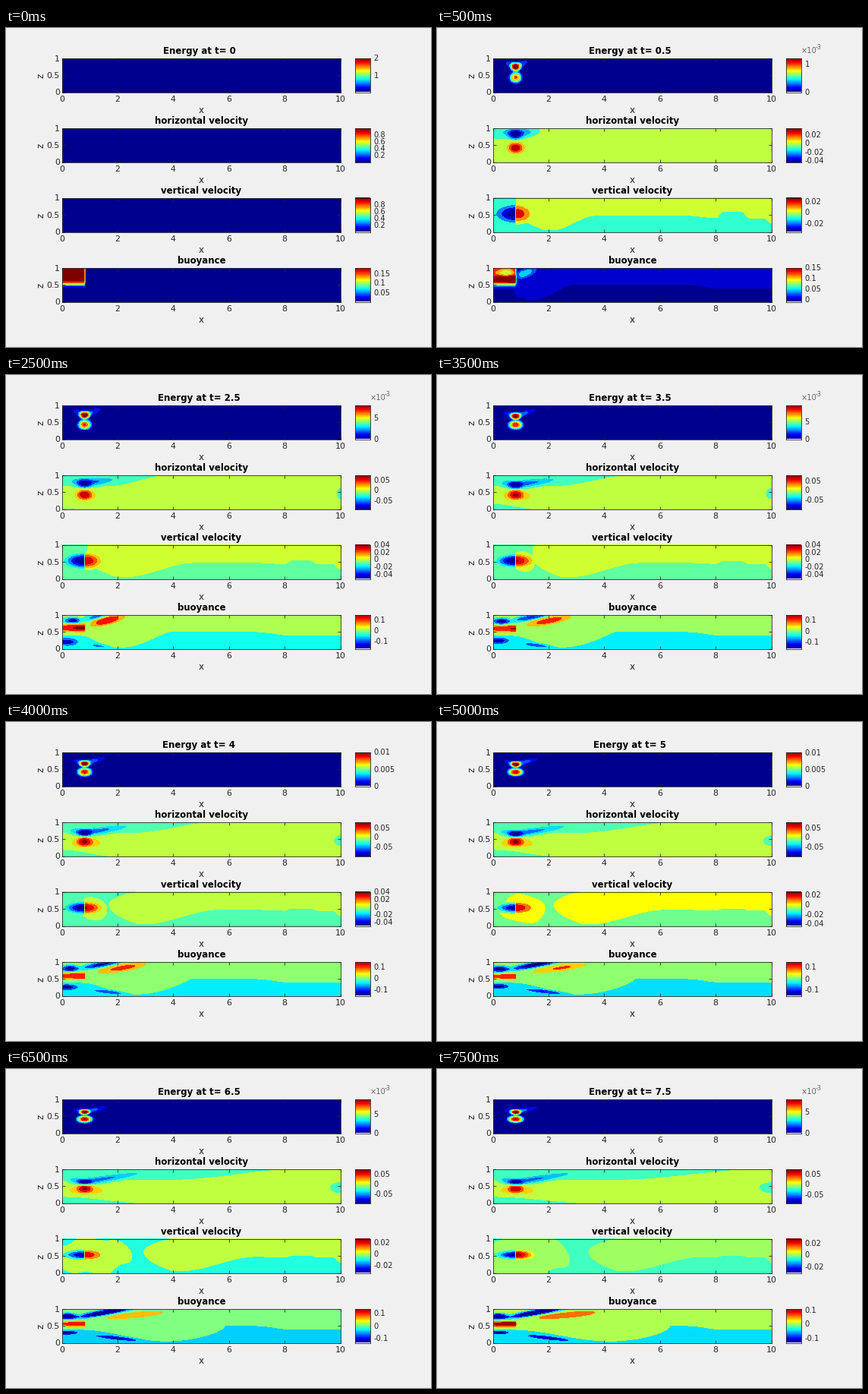
A matplotlib script for the animation above (8000 ms loop, 560 by 420 pixels).

```python
import numpy as np
import matplotlib.pyplot as plt
from matplotlib.animation import FuncAnimation
from matplotlib.colors import ListedColormap

W, H, DPI = 560, 420, 100
LEFT, WIDE, TALL = 73.5, 367, 45
TOPS = [39.5 + 92 * i for i in range(4)]
NAMES = ("Energy", "horizontal velocity", "vertical velocity", "buoyance")
GREY = "0.15"
EDGE = 0.82
plt.rcParams["font.family"] = "DejaVu Sans"

X, Z = np.meshgrid(np.linspace(0, 10, 369), np.linspace(0, 1, 93))

# 64-step jet that starts at a lighter navy
ramp = np.arange(1, 65) / 64
jet = ListedColormap(np.clip(
    [1.5 - abs(4 * ramp - c) for c in (3, 2, 1)], 0, 1).T)


def smooth(a, b, x):
    u = np.clip((x - a) / (b - a), 0, 1)
    return u * u * (3 - 2 * u)


def mix(t, v):
    """Ease from the first to the second value as the flow settles."""
    if not isinstance(v, tuple):
        return v
    s = np.clip((t - 1.5) / 6, 0, 1)
    return v[0] + (v[1] - v[0]) * (1 - (1 - s) ** 2)


def beam(t, amp, x, z, left, right, width, slope=0, bend=False):
    """Compact bump with its own reach to each side; bend makes it a V."""
    x, z, left, right, width, slope = (
        mix(t, v) for v in (x, z, left, right, width, slope))
    dx = X - x
    reach = np.where(dx < 0, max(left, 1e-6), max(right, 1e-6))
    axis = z + slope * (abs(dx) if bend else dx)
    r2 = (dx / reach) ** 2 + ((Z - axis) / width) ** 2
    return mix(t, amp) * np.clip(1 - r2, 0, None) ** 2


def oval(x, z, hx, hz):
    return 1 - np.hypot((X - x) / hx, (Z - z) / hz)


def faint(d, size):
    return size * np.clip(d / 0.05, -1, 1)


def pulse(t):
    u = t / 4.6
    return (u * np.exp(1 - u)) ** 1.6


def energy(t, lo, hi):
    f = beam(t, .85, EDGE, (.74, .61), .27, .27, (.2, .11))
    f += beam(t, (.85, 1), EDGE, (.43, .41), (.32, .42), (.32, .42), (.24, .15))
    f += beam(t, .3, EDGE, (.74, .62), (.65, .6), (.8, 1.25), (.16, .1),
              (.35, .17), True)
    return hi * f


def horizontal(t, lo, hi):
    end = .9 + 1.2 * t
    top = .67 + .33 * smooth(.45 * end, end, X)
    strip = .2 * smooth(2, 4, t) * (1 - smooth(0, .5 * t, X)) - .01
    d = np.minimum(top - Z, Z - strip)
    d = np.minimum(d, -oval(10, .45, .06 * t, .17))
    f = beam(t, .55 * hi, EDGE, .42, .36, .36, .2)
    f += beam(t, .5 * hi, EDGE, (.41, .42), (.5, .95), (.55, 1.15),
              (.3, .2), (0, -.1), True)
    f += beam(t, .55 * lo, EDGE, (.8, .61), .38, .38, (.25, .15))
    f += beam(t, .55 * lo, EDGE, (.83, .61), (.75, .85), (1, 3.1),
              (.22, .17), (.08, .13), True)
    return f + faint(d, .001)


def vertical(t, lo, hi):
    start = .85 + .5 * max(t - 2.3, 0)
    bump = min(1, 1.5 / t)
    floor = .06 + .42 * smooth(start + 1.3, 3.4 + .55 * t, X)
    floor += bump * (.18 * (smooth(8, 8.25, X) - smooth(8.95, 9.2, X))
                     - .07 * smooth(7, 8.1, X))
    floor -= .15 * smooth(9.75, 10, X)
    cap = np.sqrt(np.clip((X - start) / 1.2, 0, 1))
    roof = .62 + .42 * cap + 1 - smooth(2.5, 4, t)
    right = np.minimum(Z - np.maximum(floor, .62 - .6 * cap), roof - Z)
    right = np.where(X > start, right, -1)
    grow = max(.1, .3 * t - .65)
    left = oval(1.1, .5, grow, .08 * t) + .1 * np.sin(5 * X + 4 * Z)
    f = beam(t, lo, EDGE, .53, (1.0, .9), 0, (.38, .17))
    f += beam(t, hi, EDGE, .53, 0, (.75, .85), (.34, .18))
    return f + faint(np.maximum(left, right), .001)


def pool():
    return .185 * smooth(.38, .64, Z) * np.clip((.85 - X) / .05, 0, 1)


def buoyance(t, lo, hi):
    s = np.clip((2.6 + .5 * t - X) / mix(t, (1.5, 2.2)), 0, 1)
    line = .5 - .45 * np.sin(s * np.pi / 2) ** mix(t, (1.5, .55))
    line += .34 * (1 - smooth(.7, .7 + .47 * t, X)) - .1 * smooth(7, 8.2, X)
    f = beam(t, (.17, .13), EDGE, (.64, .55), 2.2, 0, (.19, .13))
    f += beam(t, (-.14, -.16), (.5, .2), (.85, .77), .5, (.35, .5), (.16, .14))
    f += beam(t, -.13, .2, (.16, .3), .8, .62, (.24, .1))
    f += beam(t, (.165, .09), (1.1, 2.8), (.83, .82), (.35, 2.1), (.7, 1.6),
              (.22, .13), (.25, .08))
    f += beam(t, (-.04, -.17), (1.1, 1.5), (.96, .88), (.3, 1.3), (.3, 1.7),
              .13, .14)
    f += beam(t, (-.04, -.12), (1, 1.9), (.06, .15), (.2, 1.1), (.3, 1.4),
              .1, -.09)
    w = min(1, t / 1.5)
    return w * (f + faint(Z - line, .004)) + (1 - w) * pool()


FIELDS = (energy, horizontal, vertical, buoyance)


def limits(i, t):
    if t == 0:
        return .001, (2, .99, .99, .182)[i]
    if i == 0:
        return 0, .0102 * pulse(t)
    if i == 1:
        return -.1 * pulse(t) ** .4, .082 * pulse(t) ** .4
    if i == 2:
        g = min(1, .5 + t / 3)
        return (g * (.024 * smooth(3, 8, t) - .053),
                g * (.04 - .013 * smooth(4, 5, t)))
    return (min(-.01, .008 * t - .19 * smooth(.6, 2.4, t)),
            .15 - .042 * smooth(6, 7.5, t))


def nice(span, most):
    """Smallest 1-2-5 step that splits span into at most so many parts."""
    return next(m * 10.0 ** p for p in range(-5, 2) for m in (1, 2, 5)
                if span / (m * 10.0 ** p) <= most)


fig = plt.figure(figsize=(W / DPI, H / DPI), dpi=DPI, facecolor="#f0f0f0")


def box(x, y, w, h):
    ax = fig.add_axes([x / W, 1 - (y + h) / H, w / W, h / H])
    for s in ax.spines.values():
        s.set(color=GREY, linewidth=.6)
    return ax


def label(x, y, s, px=11, ha="center", va="baseline", color=GREY, **kw):
    return fig.text(x / W, 1 - y / H, s, fontsize=px * 72 / DPI, ha=ha, va=va,
                    color=color, **kw)


axes, titles = [], []
for top, name in zip(TOPS, NAMES):
    ax = box(LEFT, top, WIDE, TALL)
    ax.set(xlim=(0, 10), ylim=(0, 1), xticks=range(0, 11, 2),
           yticks=(0, .5, 1), facecolor=jet(0))
    ax.set_axisbelow(False)
    ax.tick_params(direction="in", top=True, right=True, length=2.7, width=.6,
                   color=GREY, labelbottom=False, labelleft=False)
    for v in range(0, 11, 2):
        label(LEFT + WIDE * v / 10, top + 57.5, f"{v}")
    for v in (0, .5, 1):
        label(71, top + 49 - TALL * v, f"{v:g}", ha="right")
    label(257, top + 72, "x", 12)
    label(45.5, top + 23, "z", 12, va="center", rotation=90)
    titles.append(label(257.5, top - 5.5, name, 11.75, weight="bold",
                        color="black"))
    bar = box(459.5, top, 20, TALL)
    bar.imshow(np.linspace(0, 1, 64)[:, None], cmap=jet, aspect="auto",
               origin="lower")
    bar.set(xticks=(), yticks=())
    axes.append(ax)
titles[0].set_x(254.5 / W)

power = [label(480, 33, "×10", 9.9, "left", color="0.4"),
         label(499, 28.5, "-3", 8, "left", color="0.4")]
drawn = []


def fill(ax, f, lo, hi):
    step = nice(hi - lo, 11.4)
    lev = step * np.arange(np.floor(lo / step) - 1, np.ceil(hi / step) + 2)
    f = np.clip(f, lev[0] + step / 2, lev[-1] - step / 2)
    colors = jet(np.clip((lev[:-1] - lo) / (hi - lo), 0, 1))
    drawn.append(ax.contourf(X, Z, f, levels=lev - 1e-9, colors=colors))


def scale(i, t, lo, hi, small):
    step = nice(hi - lo, 2.1 if i == 0 else 4.7 if t else 5)
    for k in range(int(np.ceil(lo / step)), int(np.floor(hi / step + .02)) + 1):
        y = TOPS[i] + TALL * (1 - (k * step - lo) / (hi - lo))
        text = f"{k * step * (1000 if small else 1):.3g}"
        drawn.append(label(484.5, y + 3.5, text, 9.9, "left"))


def draw(n):
    t = n / 2
    while drawn:
        drawn.pop().remove()
    titles[0].set_text(f"Energy at t= {t:g}")
    small = 0 < limits(0, t)[1] < .0098
    for p in power:
        p.set_visible(small)
    for i, ax in enumerate(axes):
        lo, hi = limits(i, t)
        if t:
            fill(ax, FIELDS[i](t, lo, hi), lo, hi)
        elif i == 3:
            fill(ax, pool(), lo, hi)
        scale(i, t, lo, hi, small and i == 0)
    return []


anim = FuncAnimation(fig, draw, frames=16, interval=500, repeat=True,
                     repeat_delay=0, init_func=lambda: [], blit=False)
plt.show()
```
